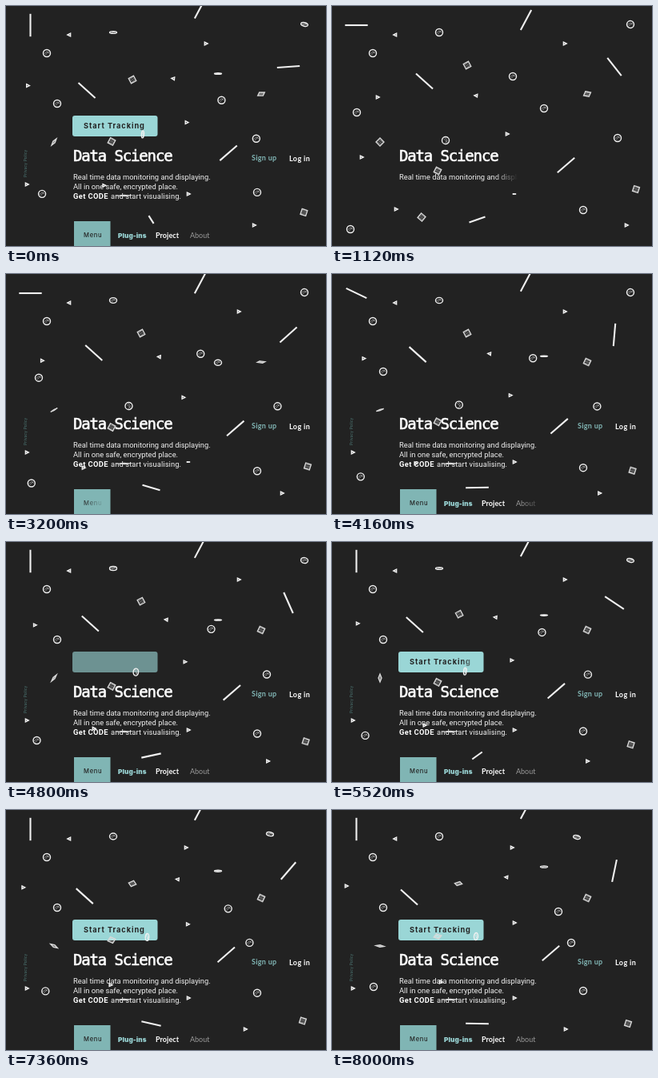
An HTML page with a canvas that plays this animation: 400 by 300 pixels, repeating every 8.04 s.

```html
<!DOCTYPE html>
<html lang="en">
<head>
<meta charset="utf-8">
<title>Data Science</title>
<style>
html, body { margin: 0; width: 100%; height: 100%; overflow: hidden; background: #222; }
canvas { display: block; }
</style>
</head>
<body>
<canvas id="stage" width="400" height="300"></canvas>
<script>
const ctx = document.getElementById('stage').getContext('2d');
const LOOP = 8040, FRAME = 40, POSTER = 6360;
const WHITE = '#f0f0f0', TEAL = '#80b5b4', DARK = '#222222', BRIGHT = '#9ad6d6';
const rad = d => d * Math.PI / 180;
const clamp = p => Math.max(0, Math.min(1, p));
const mix = (a, b, p) => a + (b - a) * p;
const ease = p => p < .5 ? 4 * p ** 3 : 1 - 4 * (1 - p) ** 3;
const progress = (t, start, length) => clamp((t - start) / length);

// Positions over time
const still = (x, y) => () => [x, y];
const drift = (x, y, X, Y) => t => {
  const p = (t - 1120) / 6880;
  return [mix(x, X, p), mix(y, Y, p)];
};
const hop = (start, x, y, X, Y) => t => {
  const p = ease(progress(t, start, 1230));
  return [mix(x, X, p), mix(y, Y, p)];
};

// Values over the tumbling key times
const TIMES = [1120, 3200, 4160, 5520, 6360, 6720, 8000];
const keys = (...v) => t => {
  if (t <= TIMES[0]) return v[0];
  let i = 1;
  while (i < 6 && t > TIMES[i]) i++;
  return mix(v[i - 1], v[i], progress(t, TIMES[i - 1], TIMES[i] - TIMES[i - 1]));
};
const constant = v => () => v;

// kind, position, tilt, squash, turn of the squash axis
const shapes = [
  ['circle', still(51, 59)],
  ['circle', drift(226, 88, 283, 127)],
  ['circle', drift(357, 165, 299, 166)],
  ['circle', drift(314, 255, 314, 226)],
  ['circle', drift(23, 279, 52, 221)],
  ['circle', hop(2680, 31, 133, 64, 122)],
  ['circle', still(134, 33), 0, keys(1, .75, .8, .3, .3, .75, 1)],
  ['circle', drift(265, 128, 265, 71), 0, keys(1, .78, .12, .15, .18, .2, .25)],
  ['circle', hop(6680, 373, 23, 306, 34), 0, keys(1, 1, 1, .5, .5, .55, .5), constant(12)],
  ['circle', drift(142, 168, 180, 158), 0, keys(1, 1, 1, .4, .35, .42, .55), constant(95)],
  ['square', hop(4650, 169, 74, 158, 92), -20, keys(1, 1, 1, 1, 1, 1, .5), constant(-8)],
  ['square', drift(132, 206, 132, 158), 28, keys(1, 1, 1, 1, 1, 1, .65)],
  ['square', drift(380, 229, 370, 267), 18],
  ['square', still(319, 110), 25, keys(.75, .25, 1, 1, .55, 1, 1), keys(-8, 0, 0, 0, -15, 0, 0)],
  ['square', still(60, 170), 45, keys(1, .08, .1, .4, .3, .4, .25), keys(0, -30, -18, -90, -53, -125, -175)],
  ['square', hop(1600, 112, 264, 148, 237), 40, keys(1, .1, .1, .1, .1, .1, .1)],
  ['triangle', still(79, 36), 180],
  ['triangle', hop(5690, 291, 47, 225, 47)],
  ['triangle', drift(180, 112, 218, 84), 185],
  ['triangle', drift(57, 114, 18, 95)],
  ['triangle', drift(219, 160, 228, 141)],
  ['triangle', drift(80, 254, 136, 215)],
  ['triangle', drift(368, 274, 292, 274)],
  ['triangle', hop(1680, 37, 189, 26, 223)],
  ['triangle', still(228, 235), 0, keys(.15, .15, 1, 1, 1, 1, 1)]
];

const outline = {
  circle() { ctx.arc(0, 0, 4.5, 0, 7); },
  square() { ctx.rect(-3.5, -3.5, 7, 7); },
  triangle() { ctx.moveTo(2.1, 0); ctx.lineTo(-1.6, -1.8); ctx.lineTo(-1.6, 1.8); ctx.closePath(); }
};

// Loose scribble inside each shape
const scribble = {
  circle() { ctx.moveTo(-3.5, 1); ctx.lineTo(0, -2); ctx.lineTo(3, 0); ctx.moveTo(-2, 2.5); ctx.lineTo(2.5, -2.5); },
  square() { for (let i = -1; i <= 1; i++) { ctx.moveTo(-3, i * 2 + .5); ctx.lineTo(3, i * 2 - .5); } },
  triangle: outline.triangle
};

function drawShape(t, [kind, place, tilt = 0, squash = constant(1), turn = constant(0)]) {
  const trace = (path, color, width) => {
    ctx.save();
    ctx.translate(...place(t));
    ctx.rotate(rad(turn(t)));
    ctx.scale(1, squash(t));
    ctx.rotate(rad(tilt));
    ctx.beginPath();
    path();
    ctx.restore();
    ctx.lineWidth = width;
    ctx.strokeStyle = color;
    ctx.stroke();
  };
  trace(scribble[kind], 'rgba(255,255,255,.5)', .9);
  trace(outline[kind], kind === 'square' ? '#d8d8d8' : WHITE, 1.4);
}

function rod([x, y], angle, rx = 14.2, ry = rx) {
  const dx = rx * Math.cos(rad(angle)), dy = ry * Math.sin(rad(angle));
  ctx.beginPath();
  ctx.moveTo(x - dx, y - dy);
  ctx.lineTo(x + dx, y + dy);
  ctx.lineWidth = 2.1;
  ctx.strokeStyle = WHITE;
  ctx.stroke();
}

function drawRods(t) {
  const spin = -.0451 * (t - 1120);
  rod([30.5, 24], 90 * ease(progress(t, 3650, 1230)));
  rod(drift(242.5, 17.5, 242.5, -1.5)(t), -62);
  rod(drift(115.5, 94, 96.5, 109)(t), 42);
  rod(drift(292.5, 199, 273.5, 179)(t), -41);
  rod([353, 76], 232 + spin);
  rod([181.5, 267], 134 + spin, 14.4, 5);
}

// Text wiped in from the left behind a soft edge
function text(t, str, x, y, font, color, start, length, spacing = 0, stroke = 0) {
  const p = progress(t, start, length), fade = 30;
  if (!p) return;
  ctx.font = font;
  ctx.letterSpacing = spacing + 'px';
  const edge = x + p * (ctx.measureText(str).width + fade);
  const wipe = ctx.createLinearGradient(edge - fade, 0, edge, 0);
  wipe.addColorStop(0, color);
  wipe.addColorStop(1, color + '00');
  ctx.fillStyle = ctx.strokeStyle = wipe;
  ctx.fillText(str, x, y);
  ctx.lineWidth = stroke;
  if (stroke) ctx.strokeText(str, x, y);
}

function drawPage(t) {
  const body = '9.35px Roboto, sans-serif', link = 'bold 9px Lato, sans-serif';
  text(t, 'Data Science', 84, 194, '19px "DejaVu Sans Mono", monospace', '#ffffff', 150, 750, -1.15, .6);
  text(t, 'Real time data monitoring and displaying.', 84, 217, body, WHITE, 650, 640);
  text(t, 'All in one safe, encrypted place.', 84, 229, body, WHITE, 1200, 600);
  text(t, 'Get CODE', 84, 241, 'bold ' + body, '#ffffff', 1700, 300, .4);
  text(t, 'and start visualising.', 131, 241, body, WHITE, 1880, 500, .1);
  text(t, 'Sign up', 307, 193, link, TEAL, 2200, 400, .3);
  text(t, 'Log in', 354, 194, link, '#ffffff', 2400, 400, .4);

  ctx.save();
  ctx.translate(26, 214);
  ctx.rotate(-Math.PI / 2);
  text(t, 'Privacy Policy', 0, 0, '5px Lato, sans-serif', '#4b7673', 2600, 400, .3);
  ctx.restore();

  const rise = ease(progress(t, 2600, 500));
  ctx.fillStyle = TEAL;
  ctx.fillRect(85, 300 - 31 * rise, 45.5, 31);
  text(t, 'Menu', 97, 289, '500 7.6px Inter, sans-serif', DARK, 3000, 400, .7);
  text(t, 'Plug-ins', 140, 290, '900 8.2px Inter, sans-serif', BRIGHT, 3300, 400, .1);
  text(t, 'Project', 187, 290, link, '#ffffff', 3600, 400, .05);
  text(t, 'About', 230, 290, '9px Lato, sans-serif', '#999999', 3900, 400);

  ctx.globalAlpha = progress(t, 4550, 400);
  ctx.fillStyle = BRIGHT;
  ctx.beginPath();
  ctx.roundRect(83, 137, 106.5, 26, 3);
  ctx.fill();
  ctx.globalAlpha = 1;
  text(t, 'Start Tracking', 97, 153, 'bold 9.2px Inter, sans-serif', DARK, 5000, 600, .95);
}

function draw(now) {
  const clock = Math.floor(now % LOOP / FRAME) * FRAME;
  const t = clock < FRAME ? POSTER : clock;   // the loop opens on a finished page
  ctx.fillStyle = DARK;
  ctx.fillRect(0, 0, 400, 300);
  drawPage(t);
  drawRods(t);
  shapes.forEach(s => drawShape(t, s));
}

const begin = performance.now();
function tick() {
  draw(performance.now() - begin);
  requestAnimationFrame(tick);
}
tick();
</script>
</body>
</html>
```
